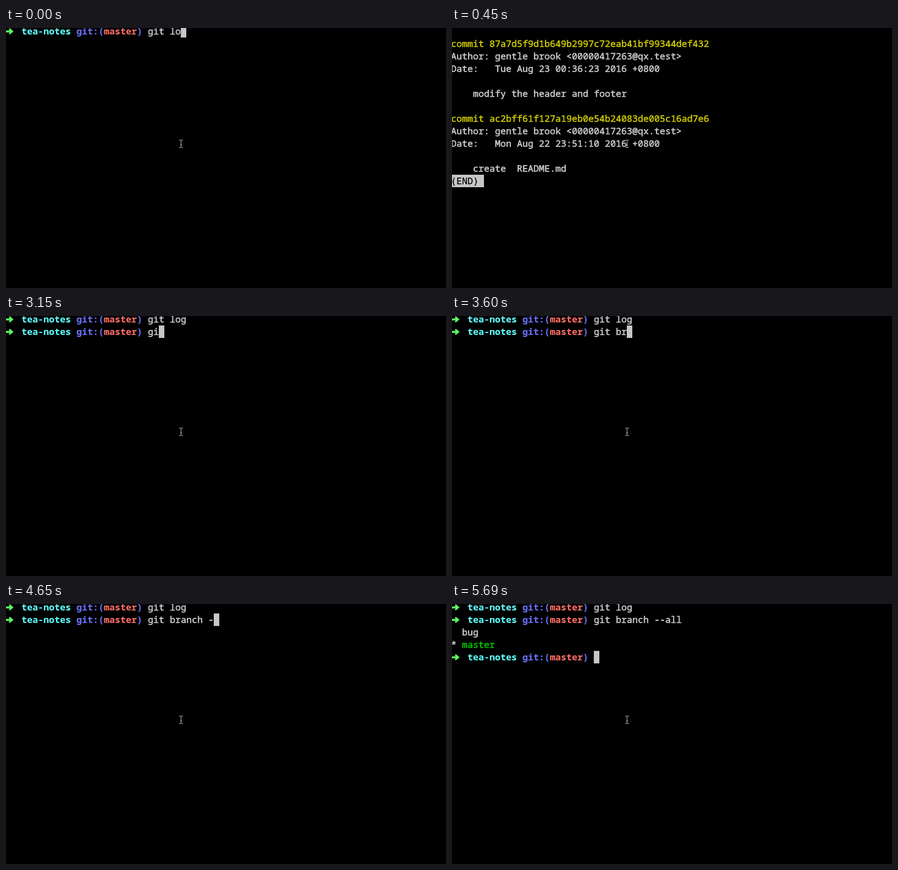
Recreate the animation shown at these times as an HTML page with a canvas. Size 881 by 521 pixels, loop 8000 ms.

```html
<!DOCTYPE html>
<html lang="en">
<head>
<meta charset="utf-8">
<title>Terminal session</title>
<style>
  html, body { margin: 0; width: 100%; height: 100%; overflow: hidden; background: #000; }
  canvas { display: block; }
</style>
</head>
<body>
<canvas id="stage" width="881" height="521"></canvas>
<script>
const ctx = document.getElementById("stage").getContext("2d");
const LOOP = 8000;
const CELL = 11, LINE = 25, LEFT = -2, TOP = -6, BASELINE = 19;
const FAMILY = '"Noto Sans Mono", "DejaVu Sans Mono", monospace';
const SIZE = CELL / 0.6; // the font advances 0.6 em per character
const PROMPT_COLS = 26;

const FG = "#c7c7c7", YELLOW = "#c7c400", GREEN = "#00c200";
const LIME = "#5ffa68", CYAN = "#60fdff", BLUE = "#6871ff", RED = "#ff6e67";

const COMMAND = "git branch --all";
// [time, characters typed]
const KEYS = [[2400, 0], [3150, 2], [3300, 3], [3450, 5], [3600, 6], [3750, 7], [3900, 8],
  [4050, 10], [4350, 11], [4650, 12], [4800, 13], [4950, 14], [5100, 16]];

const LOG = [
  [1, "commit 87a7d5f9d1b649b2997c72eab41bf99344def432", YELLOW],
  [2, "Author: gentle brook <00000417263@qx.test>"],
  [3, "Date:   Tue Aug 23 00:36:23 2016 +0800"],
  [5, "    modify the header and footer"],
  [7, "commit ac2bff61f127a19eb0e54b24083de005c16ad7e6", YELLOW],
  [8, "Author: gentle brook <00000417263@qx.test>"],
  [9, "Date:   Mon Aug 22 23:51:10 2016 +0800"],
  [11, "    create  README.md"]
];

const cellX = col => LEFT + col * CELL;
const rowY = row => TOP + row * LINE;

// A thin outline gives regular text its medium weight.
function write(row, col, text, color = FG, weight = 400, outline = 0.7) {
  const x = cellX(col), y = rowY(row) + BASELINE;
  ctx.font = `${weight} ${SIZE}px ${FAMILY}`;
  ctx.fillStyle = ctx.strokeStyle = color;
  ctx.lineJoin = "round";
  ctx.lineWidth = outline;
  ctx.fillText(text, x, y);
  ctx.strokeText(text, x, y);
}

function writeBold(row, col, text, color) {
  write(row, col, text, color, 700, 0.15);
}

function block(row, col, cols = 1) {
  ctx.fillStyle = FG;
  ctx.fillRect(cellX(col), rowY(row), cols * CELL, LINE);
}

function arrow(row) {
  const y = rowY(row) + 12.75;
  ctx.beginPath();
  ctx.moveTo(-1, y - 1.5);
  ctx.lineTo(8, y - 1.5);
  ctx.lineTo(6, y - 4.5);
  ctx.lineTo(8, y - 5.5);
  ctx.lineTo(14.5, y);
  ctx.lineTo(8, y + 5.5);
  ctx.lineTo(6, y + 4.5);
  ctx.lineTo(8, y + 1.5);
  ctx.lineTo(-1, y + 1.5);
  ctx.closePath();
  ctx.lineJoin = "round";
  ctx.lineWidth = 1;
  ctx.fillStyle = ctx.strokeStyle = LIME;
  ctx.fill();
  ctx.stroke();
}

function prompt(row, command = "") {
  arrow(row);
  writeBold(row, 3, "tea-notes", CYAN);
  writeBold(row, 13, "git:(", BLUE);
  writeBold(row, 18, "master", RED);
  writeBold(row, 24, ")", BLUE);
  write(row, PROMPT_COLS, command);
}

function typing(row, command) {
  prompt(row, command);
  block(row, PROMPT_COLS + command.length);
}

function pager() {
  for (const [row, text, color] of LOG) write(row, 0, text, color);
  block(12, 0, 6);
  write(12, 0, "(END)", "#000", 400, 0.3);
}

function shell(t) {
  if (t < 300) return typing(0, t < 150 ? "git lo" : "git log");
  prompt(0, "git log");
  if (t < 2400) return block(1, 0);
  if (t < 5690) {
    const typed = KEYS.filter(([at]) => at <= t).pop()[1];
    return typing(1, COMMAND.slice(0, typed));
  }
  prompt(1, COMMAND);
  write(2, 2, "bug");
  write(3, 0, "*");
  write(3, 2, "master", GREEN);
  typing(4, "");
}

function pointer() {
  const beam = new Path2D("M347 224.5h3M351 224.5h3M350.5 225v14M347 239.5h3M351 239.5h3M349 234.5h3");
  ctx.lineWidth = 3;
  ctx.strokeStyle = "#000";
  ctx.stroke(beam);
  ctx.lineWidth = 1;
  ctx.strokeStyle = "#d8d8d8";
  ctx.stroke(beam);
}

function draw(now) {
  const t = now % LOOP;
  ctx.fillStyle = "#000";
  ctx.fillRect(0, 0, 881, 521);
  if (t >= 450 && t < 2250) pager();
  else shell(t);
  pointer();
  requestAnimationFrame(draw);
}

draw(performance.now());
</script>
</body>
</html>
```
